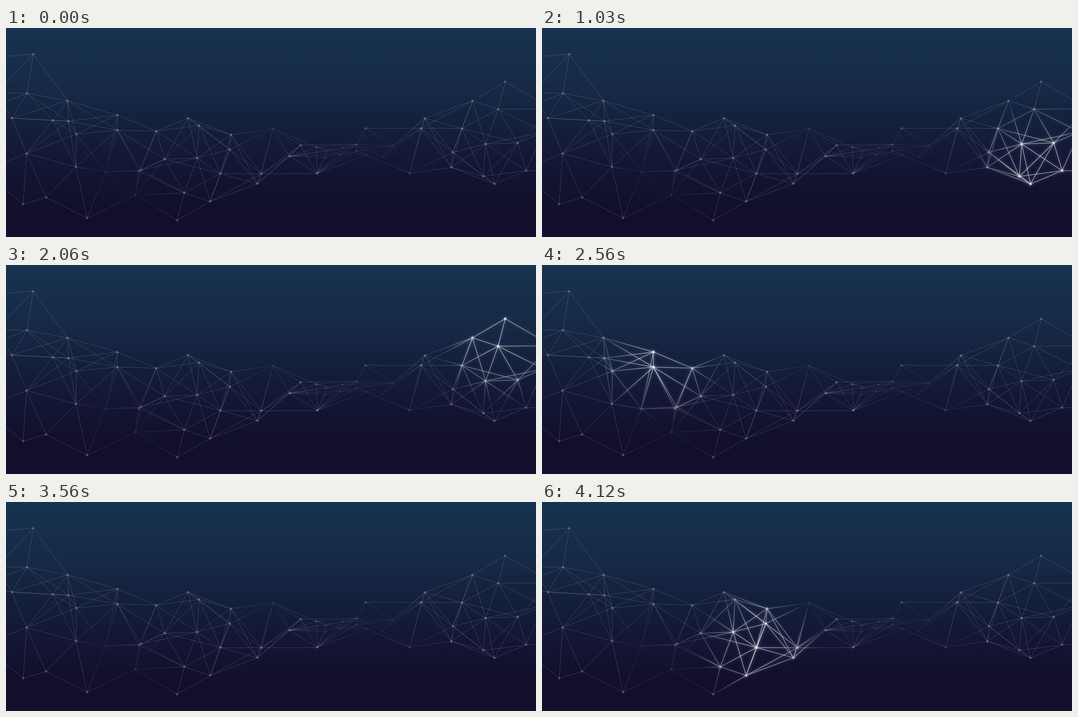
Animation of 1189 by 471 pixels, one loop 4620 ms. Source, as an HTML page with a canvas:

```html
<!DOCTYPE html>
<html lang="en">
<head>
<meta charset="utf-8">
<title>Node mesh</title>
<style>
html, body { margin: 0; width: 100%; height: 100%; overflow: hidden; background: #121432; }
canvas { display: block; }
</style>
</head>
<body>
<canvas id="stage" width="1189" height="471"></canvas>
<script>
const W = 1189, H = 471, LOOP = 4620;
const LINK = 134;   // nodes closer than this are joined
const CROWD = 10;   // nodes with more neighbours are thinned
const REACH = 146;  // radius of the light
const stage = document.getElementById('stage').getContext('2d');

const nodes = [
  [61, 59], [47, 147], [13, 203], [138, 164], [105, 208], [140, 210], [158, 239], [46, 283],
  [157, 313], [90, 382], [38.5, 397], [182, 428.5], [250, 196], [250, 230], [223, 324], [298, 323],
  [302.5, 320], [290, 377], [337, 232.5], [356, 295.5], [400, 371.5], [384, 433.5], [408, 203],
  [433, 219.5], [429, 293], [505, 240.5], [502, 274], [481, 328], [458, 391], [573, 328.5],
  [564, 351], [599, 227], [636, 289], [661, 264], [696, 268.5], [718, 278], [698, 328], [717, 292],
  [749, 284.5], [755, 270], [787, 262], [786, 276.5], [809, 286], [806.5, 226], [868, 265],
  [844, 290.5], [905.5, 327.5], [931, 226], [940, 203.5], [1023, 226.5], [1002.5, 280], [999, 314],
  [1046.5, 164], [1104, 183], [1120, 121], [1076, 261.5], [1071, 334.5], [1096, 351.5],
  [1148, 259], [1167, 321.5],
  // beyond the edges
  [-65, 69], [-20, 146], [-50, 187], [-52, 322], [1206, 234], [1225, 182], [1290, 323]
].map(([x, y]) => ({ x, y }));

// Regions where the resting mesh fades out.
const fades = [
  { x: 255, y: 350, r: 52, depth: .88 },
  { x: 599, y: 222, r: 40, depth: .68 },
  { x: 755, y: 272, r: 66, depth: .6 },
  { x: 850, y: 298, r: 72, depth: .76 }
];

// Start time and centre of the light; no centre means dark.
const cues = [
  [0], [500, 34, 121], [1030, 1115, 303], [1530, 104, 346], [2060, 1112, 170],
  [2560, 262, 217], [3090, 928, 228], [3560], [3590, 675, 299], [4120, 484, 326]
];

const dist = (a, b) => Math.hypot(a.x - b.x, a.y - b.y);
const near = (a, b) => a !== b && dist(a, b) < LINK;
const white = a => `rgba(238,240,248,${a})`;

for (const n of nodes) {
  n.crowded = nodes.filter(m => near(n, m)).length > CROWD;
  n.level = Math.min(...fades.map(f => 1 - f.depth * Math.exp(-((dist(n, f) / f.r) ** 8))));
}

const links = [];
nodes.forEach((a, i) => nodes.forEach((b, j) => {
  const thinned = a.crowded && b.crowded && i * j % 4;
  if (i < j && near(a, b) && !thinned) links.push([a, b]);
}));

function layer() {
  const c = document.createElement('canvas');
  c.width = W;
  c.height = H;
  return c.getContext('2d');
}

function addStops(grad, stops) {
  for (const [p, c] of stops) grad.addColorStop(p, c);
  return grad;
}

function drawMesh(g, lineAlpha, dotAlpha, level) {
  for (const [a, b] of links) {
    g.strokeStyle = addStops(g.createLinearGradient(a.x, a.y, b.x, b.y),
      [[0, white(lineAlpha * level(a))], [1, white(lineAlpha * level(b))]]);
    g.beginPath();
    g.moveTo(a.x, a.y);
    g.lineTo(b.x, b.y);
    g.stroke();
  }
  for (const n of nodes) {
    g.fillStyle = white(dotAlpha * level(n));
    g.beginPath();
    g.arc(n.x, n.y, 2.7, 0, Math.PI * 2);
    g.fill();
  }
}

const base = layer();
base.fillStyle = addStops(base.createLinearGradient(0, 0, 0, H), [
  [0, '#16334f'], [.25, '#162b47'], [.5, '#141e3b'], [.66, '#131634'], [.85, '#120f2b'], [1, '#110f2b']
]);
base.fillRect(0, 0, W, H);
base.lineWidth = 1;
drawMesh(base, .19, .2, n => n.level);

const bright = layer();
bright.lineWidth = 1.15;
bright.shadowColor = 'rgba(255,255,255,.6)';
bright.shadowBlur = 7;
drawMesh(bright, .75, .95, n => .35 + .65 * n.level);

const light = layer();

function shine(x, y) {
  light.globalCompositeOperation = 'copy';
  light.drawImage(bright.canvas, 0, 0);
  light.globalCompositeOperation = 'destination-in';
  light.fillStyle = addStops(light.createRadialGradient(x, y, 0, x, y, REACH),
    [[0, 1], [.3, .93], [.6, .58], [.82, .22], [1, 0]].map(([p, a]) => [p, white(a)]));
  light.fillRect(0, 0, W, H);
  stage.drawImage(light.canvas, 0, 0);
}

let shown = null;
function frame() {
  const t = performance.now() % LOOP;
  const cue = cues.filter(c => c[0] <= t).pop();
  if (cue !== shown) {
    shown = cue;
    stage.drawImage(base.canvas, 0, 0);
    if (cue.length > 1) shine(cue[1], cue[2]);
  }
  requestAnimationFrame(frame);
}
frame();
</script>
</body>
</html>
```
